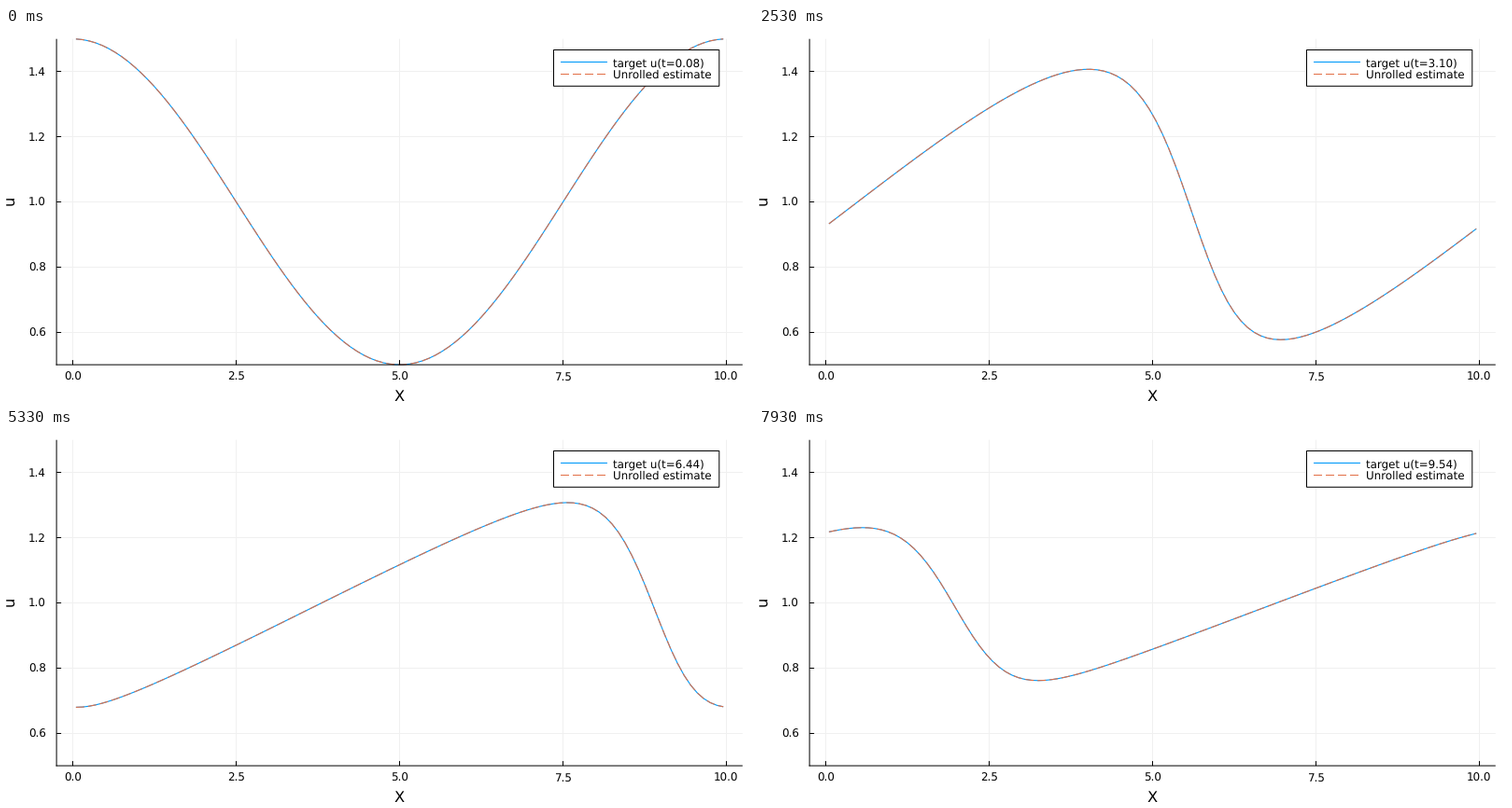
A matplotlib script that plays this animation: 800x400 px, repeating every 8 s.

```python
import matplotlib
import matplotlib.pyplot as plt
import numpy as np
from matplotlib.animation import FuncAnimation
from matplotlib.patches import Rectangle

W, H, DPI = 800, 400, 100
PX = 72 / DPI                      # points per pixel
STEPS, LOOP_MS, TICK_MS = 120, 8000, 20
DT = 0.07948                       # simulated time per step
LENGTH, CELLS, NU = 10.0, 100, 0.1
BLUE, ORANGE, GRID = "#009AFA", "#E26F46", "#F0F0F0"
LEFT, RIGHT, TOP, BOTTOM = 54.1, 788.8, 11.7, 361.1
DASH = (0, (9 * PX, 4 * PX))

matplotlib.rcParams.update({
    "font.family": "DejaVu Sans",
    "text.hinting": "none",
    "path.snap": False,
    "lines.scale_dashes": False,
})


def rate(u, dx):
    """Viscous Burgers equation, upwind flux, periodic domain."""
    left, right = np.roll(u, 1), np.roll(u, -1)
    advection = (u**2 - left**2) / (2 * dx)
    diffusion = NU * (right - 2 * u + left) / dx**2
    return diffusion - advection


def solve(u, dx, substeps=5):
    """Runge-Kutta solution, one row per step."""
    h = DT / substeps
    rows = [u]
    for _ in range(STEPS - 1):
        for _ in range(substeps):
            a = rate(u, dx)
            b = rate(u + h / 2 * a, dx)
            c = rate(u + h / 2 * b, dx)
            d = rate(u + h * c, dx)
            u = u + h / 6 * (a + 2 * b + 2 * c + d)
        rows.append(u)
    return np.array(rows)


def px_x(x):
    return 71.4 + 70.03 * x


def px_y(u):
    return 186.4 - 349.4 * (u - 1)


dx = LENGTH / CELLS
x = (np.arange(CELLS) + 0.5) * dx
waves = solve(1 + 0.5 * np.cos(2 * np.pi * x / LENGTH), dx)

fig = plt.figure(figsize=(W / DPI, H / DPI), dpi=DPI, facecolor="white")
ax = fig.add_axes([0, 0, 1, 1])
ax.set(xlim=(0, W), ylim=(H, 0))
ax.axis("off")


def line(xs, ys, color="black", width=1.0, z=1, **kw):
    return ax.plot(xs, ys, color=color, lw=width * PX, zorder=z,
                   solid_capstyle="butt", dash_capstyle="butt", **kw)[0]


def label(px, py, text, size=11.87, ha="left", **kw):
    return ax.text(px, py, text, fontsize=size * PX, ha=ha, va="baseline",
                   color="black", zorder=6, **kw)


# grid, ticks and tick labels
for value in (0, 2.5, 5, 7.5, 10):
    px = np.floor(px_x(value)) + 0.5
    line([px, px], [TOP, BOTTOM], GRID)
    line([px, px], [BOTTOM, BOTTOM - 5], z=4)
    label(px - 0.3, 378.3, f"{value:.1f}", ha="center")
for value in (0.6, 0.8, 1.0, 1.2, 1.4):
    py = np.floor(px_y(value)) + 0.5
    line([LEFT, RIGHT], [py, py], GRID)
    line([LEFT, LEFT + 5], [py, py], z=4)
    label(43, py + 4.4, f"{value:.1f}", ha="right")

# axes
line([LEFT, LEFT], [TOP, BOTTOM + 0.5], z=4)
line([LEFT - 0.5, RIGHT], [BOTTOM, BOTTOM], z=4)
label(421.2, 400, "X", 16.3, "center")
label(9, 185, "u", 16.3, "center", rotation=90, rotation_mode="anchor")

# curves
true_curve = line(px_x(x), px_y(waves[0]), BLUE, 1.1, 2)
estimate = line(px_x(x), px_y(waves[0]), ORANGE, 1.1, 3, linestyle=DASH)

# legend
ax.add_patch(Rectangle((586.5, 23.5), 177.3, 38.8, facecolor="white",
                       edgecolor="black", lw=PX, zorder=5))
line([594, 644], [36.5, 36.5], BLUE, 1.1, 6)
line([594, 644], [49.5, 49.5], ORANGE, 1, 6, linestyle=DASH)
caption = label(650.5, 41, "")
label(650.5, 54, "Unrolled estimate")


def draw(tick):
    # steps start on the nearest 10 ms, so look up mid-tick with rounding
    time = (tick + 0.5) * TICK_MS
    step = int((time + 5) * STEPS / LOOP_MS)
    y = px_y(waves[step])
    true_curve.set_ydata(y)
    estimate.set_ydata(y)
    caption.set_text(f"target u(t={(step + 1) * DT:.2f})")
    return true_curve, estimate, caption


anim = FuncAnimation(fig, draw, frames=LOOP_MS // TICK_MS, interval=TICK_MS,
                     init_func=lambda: draw(0), repeat=True, repeat_delay=0)
plt.show()
```
